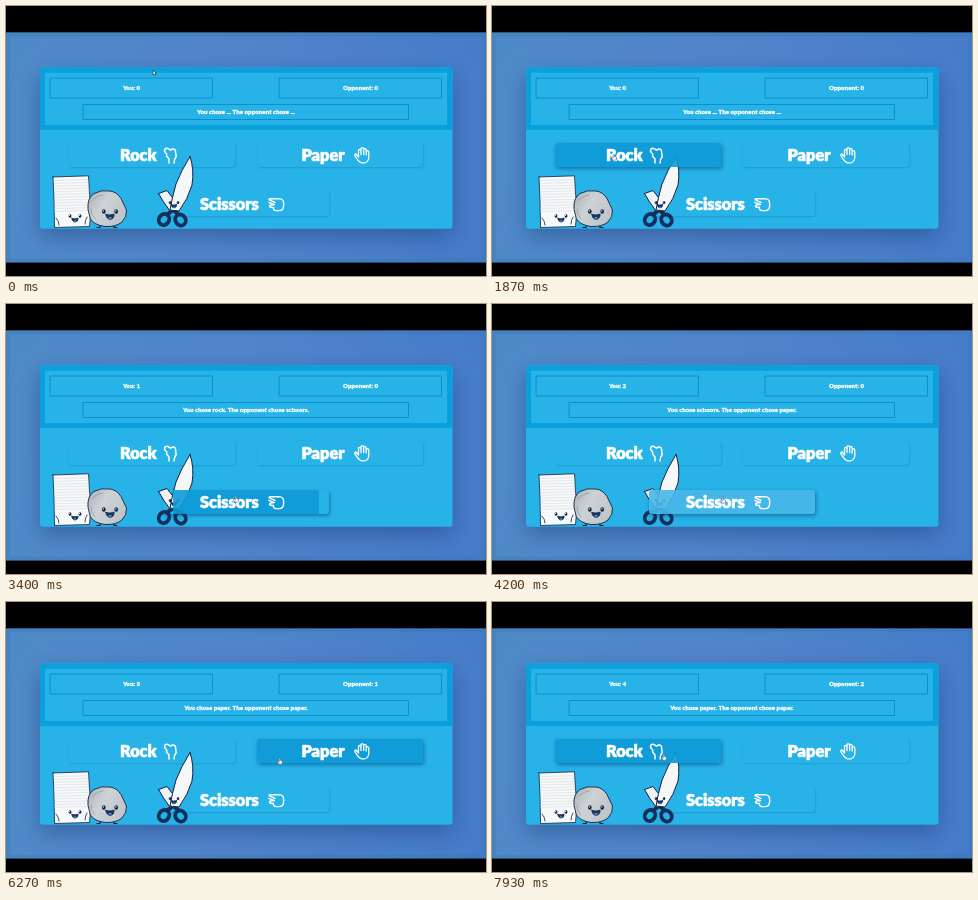
Write an HTML page with a canvas that moves like this. It is 480 by 270 pixels and loops after 8 s.

```html
<!DOCTYPE html>
<html lang="en">
<head>
<meta charset="utf-8">
<title>Rock Paper Scissors</title>
<style>
html, body { margin: 0; width: 100%; height: 100%; overflow: hidden; background: #000; }
canvas { display: block; width: 100%; height: 100%; }
</style>
</head>
<body>
<canvas id="stage" width="480" height="270"></canvas>
<script>
const canvas = document.getElementById('stage');
const ctx = canvas.getContext('2d');
const LOOP = 8000;
const CARD = '#27b2e8', BAND = '#0aa0dc', EDGE = '#0c8fcb', INK = '#10233f', NAVY = '#13305c';
const HOVER = [13, 155, 214], PRESS = [72, 185, 232];

// Pointer path: time, x, y
const path = [
  [70, 147, 66], [130, 146, 86], [270, 146, 86], [950, 128, 138], [1250, 122, 151],
  [2050, 122, 151], [2300, 150, 161], [2800, 190, 174], [3200, 222, 187], [3400, 230, 195],
  [4230, 231, 196], [4430, 240, 186], [4870, 268, 161], [5070, 274, 159],
  [7100, 274, 159], [7330, 251, 158], [7600, 229, 157], [7900, 172, 155]
];

// Rounds: click time, your score, opponent score, both moves
const rounds = [
  [0, 0, 0, '...', '...'],
  [2000, 1, 0, 'rock', 'scissors'],
  [4140, 2, 0, 'scissors', 'paper'],
  [5810, 3, 0, 'paper', 'rock'],
  [5940, 3, 1, 'paper', 'scissors'],
  [6070, 3, 1, 'paper', 'paper'],
  [6550, 4, 1, 'paper', 'rock'],
  [6790, 4, 2, 'paper', 'scissors'],
  [7030, 4, 2, 'paper', 'paper']
];

const buttons = [
  { label: 'Rock', x: 63, y: 137, tx: 114, icon: rockIcon, hover: [[950, 2300], [7600, 9000]] },
  { label: 'Paper', x: 251, y: 137, tx: 295.5, icon: paperIcon, hover: [[4870, 7330]] },
  { label: 'Scissors', x: 157, y: 186, tx: 194, icon: scissorsIcon, hover: [[3200, 4430]] }
];
const BW = 166, BH = 24;

const clamp = v => Math.max(0, Math.min(1, v));
const ease = v => 1 - Math.pow(1 - clamp(v), 1.9);

function hoverAmount(spans, t) {
  return Math.max(...spans.map(([a, b]) => t < b ? ease((t - a) / 300) : 1 - ease((t - b) / 300)));
}

// Lights up shortly around each click
function pressAmount(t) {
  return Math.max(...rounds.slice(1).map(([c]) => t < c - 80 ? 0 : 1 - clamp((t - c - 80) / 100)));
}

function pointerAt(t) {
  const i = path.findIndex(k => k[0] > t);
  if (i === 0) return path[0].slice(1);
  if (i < 0) return path[path.length - 1].slice(1);
  const a = path[i - 1], b = path[i];
  const p = (t - a[0]) / (b[0] - a[0]);
  return [a[1] + (b[1] - a[1]) * p, a[2] + (b[2] - a[2]) * p];
}

function box(x, y, w, h, r, fill) {
  ctx.beginPath();
  ctx.roundRect(x, y, w, h, r);
  ctx.fillStyle = fill;
  ctx.fill();
}

function shape(d, fill, stroke, width = 1) {
  const p = new Path2D(d);
  if (fill) { ctx.fillStyle = fill; ctx.fill(p); }
  if (stroke) { ctx.strokeStyle = stroke; ctx.lineWidth = width; ctx.stroke(p); }
}

function oval(x, y, rx, ry, fill, stroke, width = 1, turn = 0) {
  ctx.beginPath();
  ctx.ellipse(x, y, rx, ry, turn, 0, 7);
  if (fill) { ctx.fillStyle = fill; ctx.fill(); }
  if (stroke) { ctx.strokeStyle = stroke; ctx.lineWidth = width; ctx.stroke(); }
}

function shadow(color, dx, dy, blur) {
  ctx.shadowColor = color;
  ctx.shadowOffsetX = dx;
  ctx.shadowOffsetY = dy;
  ctx.shadowBlur = blur;
}

function label(text, x, y, size, align) {
  ctx.font = `900 ${size}px Lato, "Open Sans", sans-serif`;
  ctx.textAlign = align;
  ctx.fillStyle = ctx.strokeStyle = '#fff';
  ctx.lineWidth = size / 24;
  ctx.fillText(text, x, y);
  ctx.strokeText(text, x, y);
}

function background() {
  ctx.fillStyle = '#000';
  ctx.fillRect(0, 0, 480, 270);
  const g = ctx.createLinearGradient(0, 100, 480, 180);
  g.addColorStop(0, '#4f8ac8');
  g.addColorStop(0.45, '#5084ca');
  g.addColorStop(1, '#457bc9');
  ctx.fillStyle = g;
  ctx.fillRect(0, 26.4, 480, 230.1);
  ctx.strokeStyle = 'rgba(50,115,170,.3)';
  ctx.lineWidth = 4;
  ctx.strokeRect(2, 28.4, 476, 226);
}

function frameBox(x, y, w, h) {
  ctx.strokeStyle = EDGE;
  ctx.lineWidth = 1;
  ctx.strokeRect(x + .5, y + .5, w - 1, h - 1);
}

function card(t) {
  shadow('rgba(20,50,110,.42)', 0, 8, 22);
  box(34, 61.5, 412.5, 161.3, 3, CARD);
  shadow('transparent', 0, 0, 0);
  box(34, 61.5, 412.5, 62.5, [3, 3, 0, 0], BAND);
  box(39, 66.7, 402, 52.3, 0, CARD);
  frameBox(44, 71.5, 163, 21);
  frameBox(273, 71.5, 163, 21);
  frameBox(77, 98, 326, 16);
  const [, you, them, mine, theirs] = rounds.filter(r => r[0] <= t).pop();
  const result = mine === '...'
    ? 'You chose ... The opponent chose ...'
    : `You chose ${mine}. The opponent chose ${theirs}.`;
  label(`You: ${you}`, 125.5, 84, 6.2, 'center');
  label(`Opponent: ${them}`, 354.5, 84, 6.2, 'center');
  label(result, 240, 108, 6.2, 'center');
}

function face(x, y, gap, s) {
  for (const side of [-1, 1]) {
    oval(x + side * gap, y, 1.6 * s, 1.9 * s, INK);
    oval(x + side * gap - .4, y - .6, .6 * s, .6 * s, '#fff');
  }
  ctx.save();
  ctx.translate(x, y + 2.6 * s);
  ctx.scale(s, s);
  shape('M-3.6 0Q0 1 3.6 -.3Q3.5 4 .2 4.2Q-3 4.2 -3.6 0Z', '#17366b', INK, .7);
  shape('M-1.7 3.2Q0 1.4 1.9 3Q.2 4.3 -1.7 3.2Z', '#4a9be0');
  ctx.restore();
}

function paperPal() {
  shape('M47 171L82.5 169.8Q83 185 85 203L83.5 220.5L48.5 221.5Q48.5 196 47 171Z', '#f7f9fa', INK, .8);
  for (let i = 0; i < 12; i++) {
    const y = 174.5 + i * 2.8;
    shape(`M48.5 ${y}L${82 + i * .1} ${y - .8}`, null, '#d3dade', .6);
  }
  face(69, 210, 5, .9);
  shape('M50 212Q53 215 53 219M81 211Q79 214 79 218', null, INK, .8);
}

function rockPal() {
  shape('M94 217V221.5H91M108 217V221.5H111', null, INK, 1.2);
  const g = ctx.createLinearGradient(81, 190, 120, 214);
  g.addColorStop(0, '#adb5ba');
  g.addColorStop(.4, '#cdd2d5');
  g.addColorStop(1, '#bcc3c8');
  shape('M82 203Q81 192 88 187.5Q95 183.5 104 185Q111 186 115 192.5L120.5 204Q121 211 116 216Q110 221 99 220.5Q88 219 84.5 213Z', g, INK, .9);
  shape('M86 195Q90 190 97 189M89 213Q84.5 208 85 203', null, '#8f999f', .7);
  face(104, 205.5, 6.2, 1.15);
}

function scissorsPal() {
  oval(158, 213.5, 5, 5.8, null, NAVY, 3.8, .6);
  oval(174.5, 214, 5, 5.8, null, NAVY, 3.8, -.6);
  shape('M162 208L169 202M172 208L165 202', null, NAVY, 4);
  shape('M152.5 187.5L161 184.5L173 200L171 205L164 205Q157 196 152.5 187.5Z', '#eef2f4', INK, 1);
  shape('M184 150.5Q188.5 164 186 179Q182 193 173 205L164 204Q166 192 170 178Q175 165 184 150.5Z', '#f5f7f8', INK, 1);
  face(168, 196.5, 4, .8);
}

function rockIcon() {
  shape('M163 157V153L160.5 150Q161.5 148 159.3 146.5Q158 144.5 159 143Q160.5 141.6 163 143.2L164.5 144.2L166.5 143Q169.5 142.6 169.6 146L170.2 150.5Q168.2 153 168 157', null, '#fff', 1.5);
}

function paperIcon() {
  shape('M352.5 151V145Q352.5 143.3 354 143.5Q355 143.7 355 145V148.5V143Q355.2 141.5 356.5 141.8Q357.7 142 357.7 143V148.5V143.5Q358 142 359.2 142.5Q360.2 143 360.2 144V149V145.5Q361 144.2 362.2 145Q363 145.6 362.8 147V152Q362 156.5 358.5 156.8H355.5Q353.5 156.5 351 153L348.8 149.6Q348.6 148 350 148Z', null, '#fff', 1.3);
}

function scissorsIcon() {
  shape('M269 196.5L264 194.2Q262 193.2 264 192.8L273 192.6Q277.6 193 277.6 197V200Q277.4 204.6 273 204.6H270Q267 204.4 267.5 201.5L264.5 201.3Q262.6 200.4 264.3 199L268.5 198.6L262.8 196.3', null, '#fff', 1.4);
}

function buttonBase(b, p) {
  shadow(`rgba(0,55,110,${.24 + .3 * p})`, .6 + .4 * p, .8 + p, 2 + 2 * p);
  box(b.x, b.y, BW, BH, 3, CARD);
  shadow('transparent', 0, 0, 0);
}

function buttonTop(b, p, press) {
  if (p > 0) {
    const rgb = HOVER.map((v, i) => v + (PRESS[i] - v) * press);
    ctx.save();
    ctx.beginPath();
    ctx.roundRect(b.x, b.y, BW, BH, 3);
    ctx.clip();
    ctx.fillStyle = `rgba(${rgb},.9)`;
    ctx.fillRect(b.x + BW / 2 * (1 - p), b.y, BW * p, BH);
    ctx.restore();
  }
  label(b.label, b.tx, b.y + 18, 16.3, 'left');
  b.icon();
}

function pointer(t, over) {
  const [x, y] = pointerAt(t);
  ctx.save();
  ctx.translate(x, y);
  if (over) shape('M-.8 -2.4Q0 -3.2 .5 -2.4V-.5L2.4 0V2L1.5 3.2H-1L-2.4 .6L-1.7 0L-.8 .7Z', '#fff', '#50445a', .5);
  else shape('M0 -1.5V3L1 2L1.8 3.5L2.6 3.1L1.9 1.6H3.2Z', '#fff', '#222', .6);
  ctx.restore();
}

function draw(t) {
  const amounts = buttons.map(b => hoverAmount(b.hover, t));
  const over = buttons.some(b => b.hover.some(([a, z]) => t >= a && t < z));
  const press = pressAmount(t);
  ctx.lineJoin = ctx.lineCap = 'round';
  background();
  card(t);
  buttons.forEach((b, i) => buttonBase(b, amounts[i]));
  paperPal();
  rockPal();
  scissorsPal();
  buttons.forEach((b, i) => buttonTop(b, amounts[i], press));
  pointer(t, over);
}

const start = performance.now();
function tick() {
  draw((performance.now() - start) % LOOP);
  requestAnimationFrame(tick);
}
tick();
</script>
</body>
</html>
```
